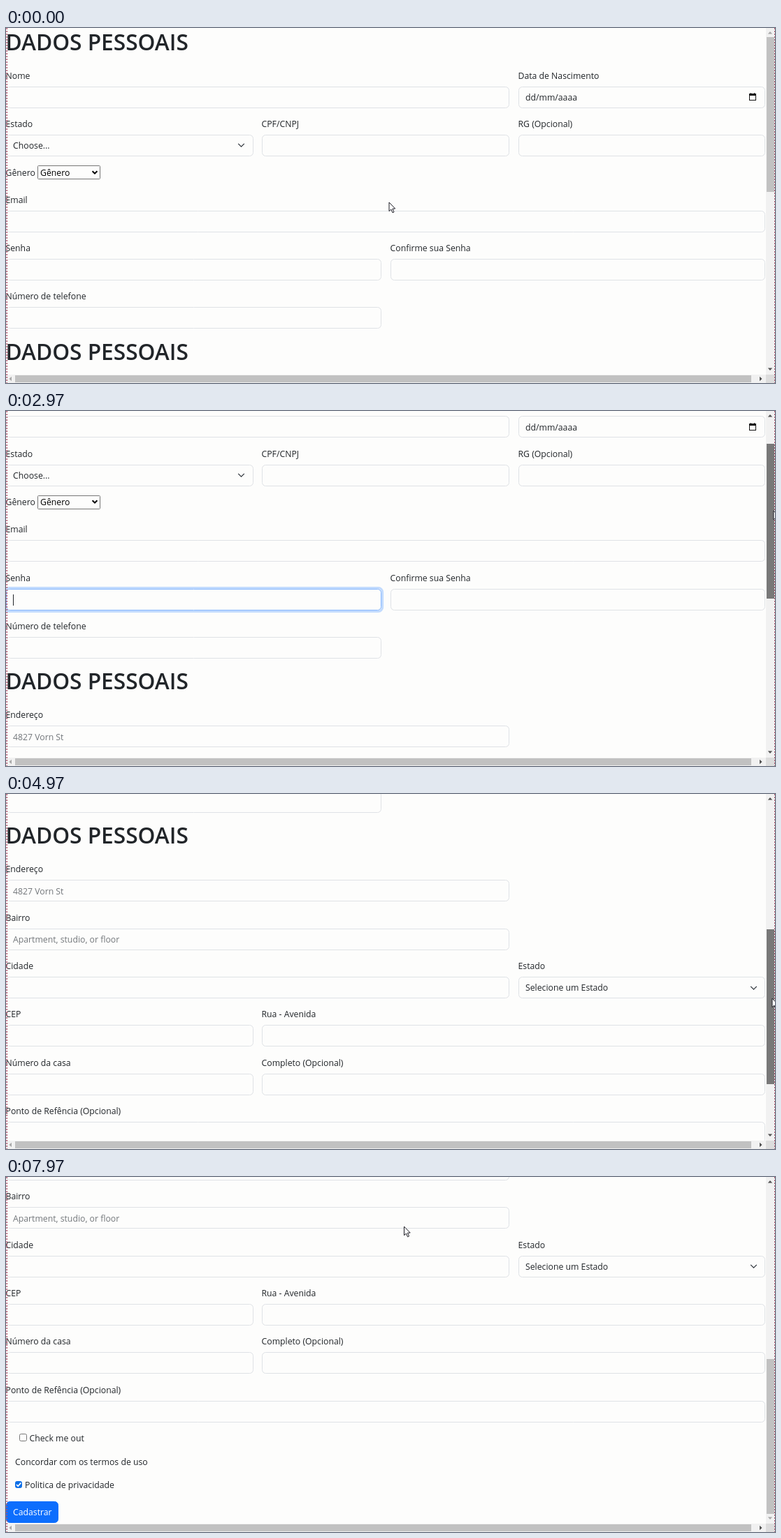
Animation of 1100x509 px, one loop 8000 ms. Source, as an HTML page with a canvas:

```html
<!DOCTYPE html>
<html lang="pt">
<head>
<meta charset="utf-8">
<style>
html, body { margin: 0; width: 100%; height: 100%; overflow: hidden; background: #fdfdfc; }
canvas { display: block; }
</style>
</head>
<body>
<canvas id="stage" width="1100" height="509"></canvas>
<script>
const ctx = document.getElementById('stage').getContext('2d');
const LOOP = 8000, MAX_SCROLL = 553.6;
const CLICK = 1440, PRESS = 2500, RELEASE = 5850;
const PAPER = '#fdfdfc', INK = '#212529', HINT = '#73777b', LINE = '#dfe2e6', BLUE = '#0d6efd';
const C1 = 0, C2 = 366, C3 = 733, HALF = 550;
const R1 = 354, R2 = 720, R3 = 1086, RHALF = 537;

// Each key is [time, value, ...].
const scrollKeys = [[2590, 0], [2970, 76], [3600, 217], [4970, 404], [5740, MAX_SCROLL]];
const pointerKeys = [
  [400, 548, 250], [1300, 420, 340], [1600, 420, 340], [2450, 1098.5, 106],
  [2570, 1098.5, 106], [2970, 1098, 143], [3600, 1098.5, 203], [4970, 1096, 293],
  [5770, 1094, 377], [6000, 1094, 377], [7400, 569.5, 71]
];

let scroll = 0;
const toY = y => Math.round(y - scroll);

function sample(keys, t) {
  const next = keys.findIndex(k => k[0] > t);
  if (next === 0) return keys[0].slice(1);
  if (next < 0) return keys[keys.length - 1].slice(1);
  const a = keys[next - 1], b = keys[next];
  const p = (t - a[0]) / (b[0] - a[0]);
  return a.slice(1).map((v, i) => v + (b[i + 1] - v) * p);
}

function text(str, x, middle, color = INK, font = '12.25px') {
  ctx.font = font + ' "Open Sans", "Noto Sans", sans-serif';
  ctx.fillStyle = color;
  ctx.fillText(str, x, toY(middle + 4.5));
}

function heading(middle) {
  text('DADOS PESSOAIS', -.6, middle + 6.4, INK, '600 31.65px');
}

function box(x, right, top, height, radius, stroke, fill = PAPER) {
  ctx.beginPath();
  ctx.roundRect(x + .5, toY(top) + .5, right - x - 1, height - 1, radius);
  ctx.fillStyle = fill;
  ctx.fill();
  ctx.strokeStyle = stroke;
  ctx.lineWidth = 1;
  ctx.stroke();
}

function polyline(points, color, width) {
  ctx.beginPath();
  points.forEach(([x, y]) => ctx.lineTo(x, y));
  ctx.strokeStyle = color;
  ctx.lineWidth = width;
  ctx.stroke();
}

function field(label, x, right, middle, value = '', color = INK) {
  text(label, x - .5, middle);
  box(x, right, middle + 15.6, 31, 5, LINE);
  text(value, x + 10, middle + 31.3, color);
}

function chevron(x, middle, r, color, width) {
  const y = toY(middle);
  polyline([[x - r, y - r / 2], [x, y + r / 2], [x + r, y - r / 2]], color, width);
}

function calendar(x, top) {
  const y = toY(top);
  ctx.fillStyle = '#111';
  ctx.fillRect(x, y + 1, 10, 10);
  ctx.fillRect(x + 2, y, 1, 1);
  ctx.fillRect(x + 7, y, 1, 1);
  ctx.fillStyle = PAPER;
  ctx.fillRect(x + 1, y + 4, 8, 6);
}

function password(t) {
  field('Senha', C1, RHALF, 315.3);
  if (t < CLICK) return;
  const y = toY(330.9);
  ctx.globalAlpha = Math.min(1, (t - CLICK) / 150);
  ctx.beginPath();
  ctx.roundRect(C1 - 1.5, y - 1.5, RHALF + 3, 34, 6);
  ctx.strokeStyle = '#c2dbfe';
  ctx.lineWidth = 3.2;
  ctx.stroke();
  box(C1, RHALF, 330.9, 31, 5, '#86b7fe');
  ctx.globalAlpha = 1;
  if (Math.floor((t - CLICK) / 530) % 2 === 0) {
    ctx.fillStyle = INK;
    ctx.fillRect(10, y + 8, 1, 16);
  }
}

function form(t) {
  heading(21);
  field('Nome', C1, R2, 68);
  field('Data de Nascimento', C3, R3, 68, 'dd/mm/aaaa');
  calendar(1063, 93);
  field('Estado', C1, R1, 137.3, 'Choose...');
  chevron(336.5, 168.3, 4.3, '#343a40', 1.3);
  field('CPF/CNPJ', C2, R2, 137.3);
  field('RG (Opcional)', C3, R3, 137.3);
  text('Gênero', -.5, 207);
  box(45, 135, 197, 20, 1, '#767676');
  text('Gênero', 49, 207, '#000');
  chevron(127, 206.5, 3.4, '#000', 2);
  field('Email', C1, R3, 246);
  password(t);
  field('Confirme sua Senha', HALF, R3, 315.3);
  field('Número de telefone', C1, RHALF, 384.6);

  heading(464.6);
  field('Endereço', C1, R2, 512, '4827 Vorn St', HINT);
  field('Bairro', C1, R2, 581.4, 'Apartment, studio, or floor', HINT);
  field('Cidade', C1, R2, 650.7);
  field('Estado', C3, R3, 650.7, 'Selecione um Estado');
  chevron(1069.5, 681.8, 4.3, '#343a40', 1.3);
  field('CEP', C1, R1, 720);
  field('Rua - Avenida', C2, R3, 720);
  field('Número da casa', C1, R1, 789.3);
  field('Completo (Opcional)', C2, R3, 789.3);
  field('Ponto de Refência (Opcional)', C1, R3, 858.6);

  box(19, 30, 921.6, 11, 2, '#767676');
  text('Check me out', 33.5, 927.6);
  text('Concordar com os termos de uso', 13, 961.6);
  box(13, 23, 989.6, 10, 2, '#0d6fe8', '#0d6fe8');
  const y = toY(989.6);
  polyline([[15, y + 5], [17.2, y + 7.3], [21.3, y + 2.6]], '#fff', 1.6);
  text('Politica de privacidade', 27, 995);
  box(C1, 75, 1018.8, 31, 5, BLUE, BLUE);
  text('Cadastrar', 10, 1034.6, '#fff');
}

function rect(x, y, w, h, color) {
  ctx.fillStyle = color;
  ctx.fillRect(x, y, w, h);
}

// A small triangle pointing along (dx, dy).
function arrow(x, y, dx, dy, active) {
  ctx.beginPath();
  ctx.moveTo(x + dx * 2, y + dy * 2);
  ctx.lineTo(x - dx * 1.5 + dy * 3.2, y - dy * 1.5 + dx * 3.2);
  ctx.lineTo(x - dx * 1.5 - dy * 3.2, y - dy * 1.5 - dx * 3.2);
  ctx.fillStyle = active ? '#505050' : '#a8a8a8';
  ctx.fill();
}

function scrollbars(t, pointerX) {
  const pressed = t >= PRESS && t < RELEASE;
  const thumb = pressed ? '#787878' : pointerX > 1087 ? '#a8a8a8' : '#c1c1c1';
  rect(1087, 0, 13, 509, '#f1f1f1');
  rect(0, 497, 1087, 12, '#f1f1f1');
  rect(1087, 497, 13, 12, '#dcdcdc');
  rect(1088, Math.round(13 + scroll * .448), 11, 222, thumb);
  rect(13, 498, 1053, 10, '#c1c1c1');
  arrow(1093, 7, 0, -1, scroll > 0);
  arrow(1093, 489, 0, 1, scroll < MAX_SCROLL);
  arrow(6.5, 503, -1, 0, false);
  arrow(1079.5, 503, 1, 0, true);
}

function edges() {
  ctx.setLineDash([2, 2]);
  for (const x of [1, 1099]) polyline([[x + .5, 0], [x + .5, 509]], '#b0506a', 1);
  polyline([[.5, 0], [.5, 509]], 'rgba(176,80,106,.45)', 1);
  ctx.setLineDash([]);
}

function pointer(x, y) {
  const shape = [[0, 0], [0, 12.6], [2.9, 10], [5, 14.8], [7, 13.9], [4.9, 9.2], [8.7, 9]];
  ctx.beginPath();
  shape.forEach(([dx, dy]) => ctx.lineTo(x + dx, y + dy));
  ctx.closePath();
  ctx.fillStyle = '#fff';
  ctx.fill();
  ctx.strokeStyle = '#1c1c24';
  ctx.lineWidth = 1;
  ctx.stroke();
}

function draw(now) {
  const t = now % LOOP;
  const [x, y] = sample(pointerKeys, t);
  scroll = sample(scrollKeys, t)[0];
  rect(0, 0, 1100, 509, PAPER);
  form(t);
  scrollbars(t, x);
  edges();
  pointer(x, y);
  requestAnimationFrame(draw);
}
requestAnimationFrame(draw);
</script>
</body>
</html>
```
